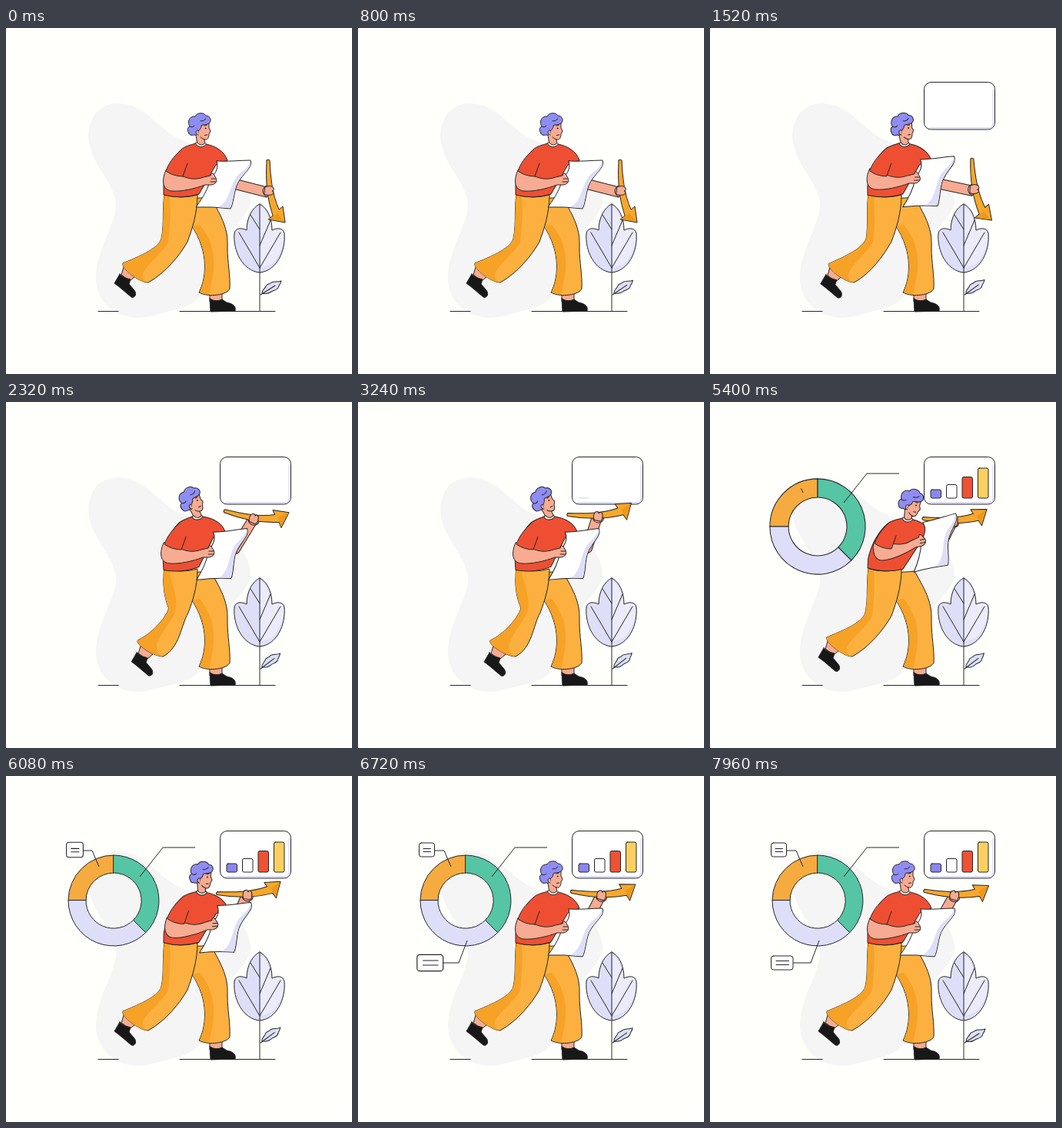
An HTML page that plays this animation: 450 by 450 pixels, repeating every 8000 ms.

```html
<!DOCTYPE html>
<html lang="en">
<head>
<meta charset="utf-8">
<title>Growth chart</title>
<style>
html, body { margin: 0; width: 100%; height: 100%; overflow: hidden; background: #fffffb; }
svg { display: block; width: 100vw; height: 100vh; }
.ink { stroke: #262626; stroke-width: 1; stroke-linejoin: round; stroke-linecap: round; }
.line { fill: none; }
.plain { stroke: none; }
.skin { fill: #f6ab92; }
.red { fill: #ee4f33; }
.pants { fill: #fbb03f; }
.amber { fill: #f6a226; }
.lilac { fill: #dedef8; }
.white { fill: #fff; }
.shoe { fill: #181818; }
.grow { stroke-dasharray: 1 2; stroke-linecap: butt; }
</style>
</head>
<body>
<svg viewBox="0 0 450 450">
  <path fill="#f5f5f5" d="M107 140C108 112 125 98 146 98C178 99 190 122 222 143C262 160 316 180 318 222C318 252 270 270 263 320C262 352 240 361 222 366C200 371 186 377 168 377C136 374 117 352 117 325C117 290 139 262 143 234C144 200 108 178 107 140Z"/>
  <path class="ink line" d="M120 368.5H146M226 368.5H350"/>

  <g class="ink">
    <path class="lilac" d="M330 229C321 233 313 246 313 263C307 260 299 259 297 267C295 290 308 316 330 318C352 316 364 290 362 267C360 259 352 260 346 263C346 246 339 233 330 229Z"/>
    <path class="plain" fill="#ebebfa" d="M331 232C339 238 344 250 345 265C352 261 360 261 361 268C362 282 355 298 346 307L331 312Z"/>
    <path class="line" d="M330 230V368M330 312L303 266M330 312L357 266M330 262L318 243M330 283L344 250"/>
    <g id="sprig">
      <path class="lilac" d="M333 345C333 340 337 339 338 336C339 332 343 334 345 331C349 329 354 331 358 329C357 334 354 335 354 338C351 342 347 341 345 343C341 346 337 346 333 345Z"/>
      <path class="line" d="M331 347L350 335"/>
    </g>
  </g>

  <g id="donut" class="ink">
    <path fill="#f6ab40" d="M140 103A59 59 0 0 0 81 162H104A36 36 0 0 1 140 126Z"/>
    <path class="lilac" d="M81 162A59 59 0 0 0 181.7 203.7L165.5 187.5A36 36 0 0 1 104 162Z"/>
    <path fill="#55c5a4" d="M140 103A59 59 0 0 1 181.7 203.7L165.5 187.5A36 36 0 0 0 140 126Z"/>
  </g>
  <g class="ink line">
    <path id="lead0" class="grow" pathLength="1" d="M174 131L204 93H246"/>
    <path id="lead1" class="grow" pathLength="1" d="M121 118L112 97H100"/>
    <path id="lead2" class="grow" pathLength="1" d="M142 214L131 243H108"/>
  </g>
  <g id="label0" class="ink"><rect class="white" x="79.5" y="87" width="20" height="18" rx="3"/><path d="M85 94.5H94.5M85 98.5H94.5"/></g>
  <g id="label1" class="ink"><rect class="white" x="79.5" y="234" width="28.5" height="18" rx="3"/><path d="M86 240.5H102.5M86 245.5H102.5"/></g>

  <g id="card" class="ink">
    <rect class="white" x="278.5" y="71.5" width="92" height="61.5" rx="9"/>
    <path class="line" style="stroke:#dedef8;stroke-width:2" d="M286 131H362Q368.5 131 368.5 124V82"/>
    <g id="bars"></g>
  </g>

  <path id="limbInk" fill="none" stroke="#262626" stroke-width="14" stroke-linejoin="round"/>
  <path id="limb" fill="none" stroke="#f6ab92" stroke-width="12" stroke-linejoin="round"/>
  <g id="grip" class="ink">
    <ellipse class="skin" cx="-3" cy="0" rx="6" ry="7"/>
    <path fill="#f7a72b" d="M-4 -40Q-2 -42 0 -40C1 -18 3 4 12 24L17 20L20 41L-2 37L4 32C-3 12 -6 -14 -4 -40Z"/>
    <path class="plain" fill="#ec981c" d="M-1 36.500L10 29L19 40Z"/>
    <path class="skin" d="M-6 -5C-1 -8 5 -6 5 -3C6 -1 4 0 3 0C6 1 5 5 1 5C-2 6 -5 5 -7 4Z"/>
  </g>

  <g class="ink">
    <path class="skin" d="M265 343V356Q273 359 281 355V343Z"/>
    <path class="shoe" d="M265 352L266 369L298 368C300 361 293 358 287 357L281 353Q273 357 265 352Z"/>
    <path class="pants" d="M215 217C230 222 250 222 266 220C282 248 289 262 288 285C288 305 292 322 291 339C288 347 264 351 251 344C262 322 264 285 236 250Z"/>
    <path class="amber plain" d="M252 343C262 322 263 288 242 258L252 256C276 285 272 315 264 347Z"/>
    <g id="foot">
      <path class="skin" d="M154 308L150 321L161 329L169 322Z"/>
      <path class="shoe" d="M148 320L141 332C148 337 157 345 163 350C168 352 171 345 166 340L160 333L162 327Q154 326 148 320Z"/>
    </g>
    <path id="leg" class="pants"/>
    <path id="legShade" class="amber plain"/>
  </g>

  <g id="torso" class="ink">
    <g id="head">
      <path class="skin" d="M246 134L249 151Q254 156 259 151L258 145C262 146 264 143 264 138L266 134L264 130V121L250 121Z"/>
      <path class="line" d="M258 127L261 126.5M258.5 139.5L261.5 139M258 145Q255 144 253 142"/>
      <circle cx="259.5" cy="130.5" r=".5" fill="#262626"/>
      <path fill="#8f8df3" d="M238 137C235 133 236 129 239 128C235 122 239 114 246 115C248 110 257 109 260 114C266 114 268 121 264 124C260 127 256 125 254 127C254 131 252 132 250 134C251 138 247 140 245 139C241 140 238 139 238 137Z"/>
      <path class="line" d="M239 128Q243 130 245 127M253 121Q257 122 260 118"/>
      <path class="skin" d="M250 133C246 132 246 139 250 139"/>
    </g>
    <path class="red" d="M247 150C240 152 232 154 228 158C217 168 208 186 205 205L205 217Q228 223 251 216L273 178L288 172C285 163 276 154 260 151Q254 158 247 150Z"/>
    <path class="white" d="M246.5 150C249 156 257 156 260.5 151L259 149.5Q254 155 248.5 149Z"/>
  </g>

  <g id="paper" class="ink">
    <path class="white" d="M274 173C290 174 305 172 318 172C322 182 306 190 300 205C296 216 296 228 292 235Q268 232 247 233C253 225 261 213 265 200C269 190 278 186 274 173Z"/>
    <path class="lilac plain" d="M317.5 173C321 182 305 190 299.5 205C295 216 295 228 291.5 234L276 233C292 225 290 205 302 191C309 185 315 181 317.5 173Z"/>
  </g>
  <g id="arm" class="ink">
    <path class="skin" d="M208 185C202 198 203 211 216 212C228 213 246 209 259 204L267 204C273 203 275 199 273 195L270 190Q267 187 266 192L257 194C246 198 238 196 230 193Z"/>
    <path class="line" d="M267 196H273M266 200H273"/>
  </g>
  <g id="sleeve">
    <path class="red" d="M227 160C217 169 211 177 208 186Q218 193 230 193L240 170Z"/>
    <path class="ink line" d="M228 158C217 168 211 177 208 186Q218 193 230 193L236 176"/>
  </g>
</svg>
<script>
const LOOP = 8000, FLOOR = 125;
const $ = id => document.getElementById(id);
const clamp = x => Math.min(1, Math.max(0, x));
const smooth = x => x * x * (3 - 2 * x);
const span = (t, from, to) => smooth(clamp((t - from) / (to - from)));
const move = (id, value) => $(id).setAttribute('transform', value);
const show = (id, on) => { $(id).style.display = on ? '' : 'none'; };

// Grow from nothing around a centre, overshooting by a quarter.
function pop(id, t, start, x, y) {
  const m = 1 - clamp((t - start) / 600);
  const s = 1 + 3 * m * m - 4 * m * m * m;
  show(id, s > 0);
  move(id, `translate(${x} ${y}) scale(${s}) translate(${-x} ${-y})`);
}

const bars = [[11, '#8987ef'], [17.5, '#fff'], [27.5, '#ef5132'], [39, '#fcd060']].map(([height, fill], i) => {
  const el = document.createElementNS('http://www.w3.org/2000/svg', 'rect');
  for (const [k, v] of Object.entries({ x: 287 + 20.5 * i, width: 13.5, rx: 2, fill })) el.setAttribute(k, v);
  $('bars').append(el);
  return { el, height };
});

// Trouser leg shaped around its knee and cuff.
function drawLeg(step) {
  const at = (x, y) => (dx = 0, dy = 0) => `${x + dx} ${y + dy} `;
  const knee = at(202 + 10 * step, 274 - 6 * step);
  const inner = at(236 + step, 278 - 4 * step);
  const heel = at(152 + 20 * step, 306 + 4 * step);
  const toe = at(185 + 20 * step, 331);
  const outside = `M206 217C203 235 206 255 ${knee()}C${knee(-4, 14)}${heel(16, -7)}${heel()}` +
    `C${heel(-3, 6)}${toe(-12, 0)}${toe()}`;
  $('leg').setAttribute('d', `${outside}C${toe(22, -12)}${inner(-10, 18)}${inner()}C${inner(6, -16)}249 240 249 217Q228 223 206 217Z`);
  $('legShade').setAttribute('d', `${outside}C${toe(-24, -10)}${knee(2, 22)}${knee(9, 4)}C${knee(12, -20)}214 235 213 219Z`);
  move('foot', `translate(${23 * step} ${6 * step})`);
}

function drawFigure(t) {
  const step = span(t, 1260, 2460) - span(t, 4600, 5350);
  const hold = span(t, 900, 1520) - span(t, 4700, 5350);
  const read = span(t, 4750, 5380) - span(t, 5450, 6400);
  const lift = span(t, 1400, 2500);
  const sway = lift * Math.sin(2 * Math.PI * (t - 3940) / 2800);

  drawLeg(step);
  move('torso', `rotate(${-4 * step + 3 * read} 228 217)`);
  move('head', `rotate(${-14 * step + 13 * read} 253 150)`);
  move('paper', `translate(${3 * hold - 4 * step + 13 * read} ${-2 * hold - 2 * step - 18 * read}) rotate(${-4 * hold - step - 14 * read} 275 215)`);
  move('arm', `translate(${-3 * step + 8 * read} ${-2 * hold - 5 * read}) rotate(${-12 * read} 212 198)`);
  move('sleeve', `translate(${-2 * step + 6 * read} ${-step - 2 * read})`);

  const reach = 39 + 8 * lift + 5.5 * step;
  const angle = (18 - 94 * lift - 3 * step + 3.5 * sway) * Math.PI / 180;
  const x = 306 + reach * Math.cos(angle), y = 200 + reach * Math.sin(angle);
  for (const id of ['limb', 'limbInk']) $(id).setAttribute('d', `M280 176L298 ${203 - 13 * lift}L${x - 2} ${y + 2}`);
  move('grip', `translate(${x} ${y}) rotate(${-81 * lift + 4 * sway - 1.5 * read})`);
}

function drawCharts(t) {
  show('card', t >= 880);
  move('card', `translate(0 ${-140 * Math.exp((880 - t) / 130)})`);
  bars.forEach(({ el, height }, i) => {
    const start = 3200 + i * 250, h = height * span(t, start, start + 420);
    el.setAttribute('y', FLOOR - h);
    el.setAttribute('height', h);
    el.setAttribute('opacity', clamp(h / 2));
  });

  pop('donut', t, 4890, 140, 162);
  [5080, 5320, 6180].forEach((start, i) => {
    const k = span(t, start, start + 300);
    show('lead' + i, k > 0);
    $('lead' + i).style.strokeDashoffset = 1 - k;
  });
  pop('label0', t, 5600, 89.5, 96);
  pop('label1', t, 6500, 93.5, 243);
}

function draw(t) {
  drawFigure(t);
  drawCharts(t);
  move('sprig', `rotate(${-6 * Math.sin(Math.PI * t / LOOP)} 331 346)`);
}

const begin = performance.now();
function tick() {
  draw((performance.now() - begin) % LOOP);
  requestAnimationFrame(tick);
}
tick();
</script>
</body>
</html>
```
